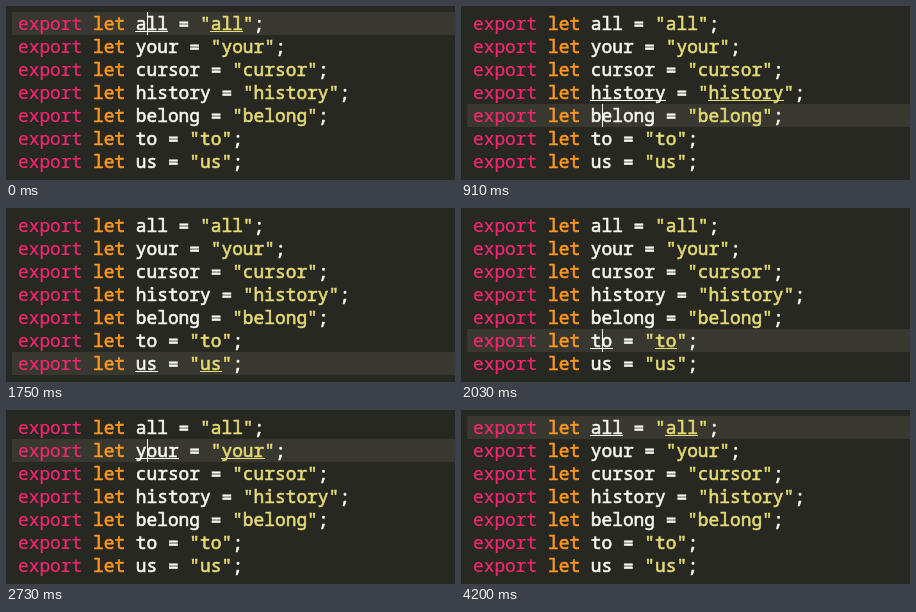
Animation, 449 px wide and 174 px high, one loop 4.27 s. Source, as an HTML page:

```html
<!DOCTYPE html>
<html>
<head>
<meta charset="utf-8">
<style>
html, body { margin: 0; width: 100%; height: 100%; overflow: hidden; background: #272822; }
#band, #caret, .line, .mark { position: absolute; }
#band { left: 6px; right: 0; height: 23px; background: #383831; }
#caret { left: 141px; width: 1px; height: 23px; background: #f8f8f0; }
.line {
  left: 12px; white-space: pre; color: #f8f8f2;
  font: 17.85px/23px "Noto Sans Mono", monospace;
  -webkit-text-stroke: .6px;
}
.mark { height: 1px; }
.key { color: #f92672; -webkit-text-stroke-width: .2px; }
.let { color: #fd971f; }
.str { color: #e6db74; }
</style>
</head>
<body>
<div id="band"></div>
<script>
const LOOP = 4270, TICK = 70, STEP = 180, BLINK = 466;
const TOP = 6, ROW = 23, LEFT = 12, CHAR = 10.71;
const words = ["all", "your", "cursor", "history", "belong", "to", "us"];
const last = words.length - 1;

const band = document.getElementById("band");
const rowTop = row => TOP + row * ROW;

// Key repeat: presses every STEP ms from start, until the edge is reached
const presses = (t, start) => Math.max(0, Math.min(last, Math.floor((t - start) / STEP) + 1));
const rowAt = (t, down, up) => presses(t, down) - presses(t, up);

function add(className, top, html = "") {
  const el = document.createElement("div");
  el.className = className;
  el.style.top = top + "px";
  el.innerHTML = html;
  document.body.append(el);
  return el;
}

function addMark(row, column, color) {
  const el = add("mark", rowTop(row) + 19);
  const x = Math.floor(LEFT + column * CHAR);
  el.style.left = x + "px";
  el.style.width = Math.ceil(LEFT + (column + words[row].length) * CHAR) - x + "px";
  el.style.background = color;
  return el;
}

const underlines = words.map((word, row) => {
  add("line", rowTop(row), `<span class="key">export</span> <span class="let">let</span> ` +
    `${word} = <span class="str">"${word}"</span>;`);
  return [addMark(row, 11, "#f8f8f2"), addMark(row, 15 + word.length, "#e6db74")];
});
const caret = add("", 0);
caret.id = "caret";

function draw(now) {
  const t = Math.floor(now % LOOP / TICK) * TICK;
  const idle = Math.max(0, t - (t < 1890 ? 1260 : 2800));
  const marked = rowAt(t, 425, 1985); // the word marks lag behind the caret
  band.style.top = caret.style.top = rowTop(rowAt(t, 350, 1890)) + "px";
  caret.hidden = Math.floor(idle / BLINK) % 2 === 1;
  underlines.forEach((pair, row) => pair.forEach(el => el.hidden = row !== marked));
  requestAnimationFrame(draw);
}
draw(0);
</script>
</body>
</html>
```
